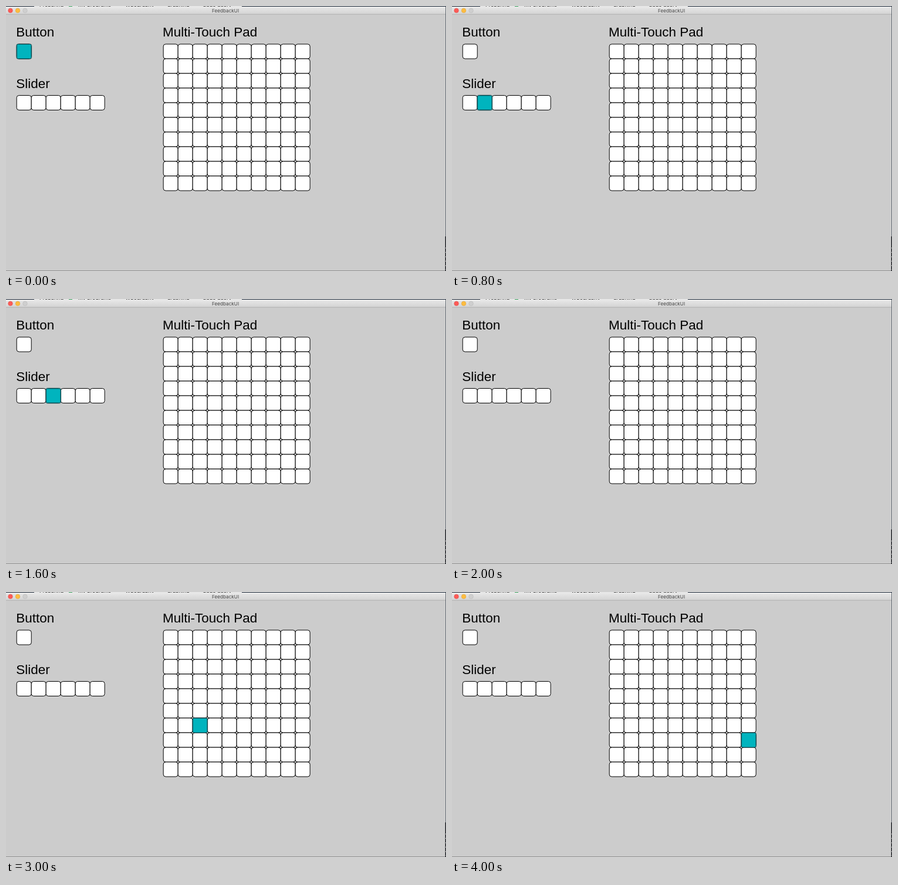
Animation, 750 px wide and 452 px high, one loop 4200 ms. Source, as an HTML page:

```html
<!DOCTYPE html>
<html lang="en">
<head>
<meta charset="utf-8">
<title>FeedbackUI</title>
<style>
  html, body { margin: 0; width: 100%; height: 100%; overflow: hidden; background: #ccc; }
  svg { display: block; width: 750px; height: 452px; }
  .head { font: 22.5px "Liberation Sans", Arial, sans-serif; }
  .title { font: 8.2px Inter, Roboto, sans-serif; fill: #444; text-anchor: middle; }
  .tab { font: 9px Inter, Roboto, sans-serif; fill: #111; }
  .cell { fill: #fff; stroke: #000; }
  #active { fill: #00b4be; stroke: #00343a; }
</style>
</head>
<body>
<svg viewBox="0 0 750 452">
  <defs>
    <linearGradient id="bar" x2="0" y2="1">
      <stop stop-color="#e9e9e9"/>
      <stop offset="1" stop-color="#d3d3d3"/>
    </linearGradient>
    <clipPath id="strip"><rect width="750" height="1.3"/></clipPath>
  </defs>

  <rect width="750" height="452" fill="#ccc"/>

  <g clip-path="url(#strip)">
    <rect width="750" height="2" fill="#1d2838"/>
    <rect x="48" width="354" height="2" fill="#e4e4e4"/>
    <rect x="107" width="6" height="2" fill="#35a05a"/>
    <g class="tab">
      <text x="57" y="1.2">Preparing</text>
      <text x="123" y="1.2">my programs</text>
      <text x="204" y="1.2">typography</text>
      <text x="275" y="1.2">graphing</text>
      <text x="336" y="1.2">page query</text>
    </g>
  </g>

  <rect y="1" width="749.5" height="13" fill="url(#bar)"/>
  <rect y="13.7" width="749.5" height=".8" fill="#a9a9a9"/>
  <circle cx="7.5" cy="7.7" r="3.8" fill="#fc5b57" stroke="#dc4643" stroke-width=".5"/>
  <circle cx="20" cy="7.7" r="3.8" fill="#fdbc40" stroke="#dda034" stroke-width=".5"/>
  <circle cx="32.5" cy="7.7" r="3.8" fill="#cfcfcf" stroke="#b5b5b5" stroke-width=".5"/>
  <text class="title" x="374" y="10.7">FeedbackUI</text>

  <rect y="451.3" width="750" height=".7" fill="#777"/>
  <rect x="749.3" width=".7" height="452" fill="#39424e"/>
  <path d="M749.4 393V452" stroke="#0c0f14" stroke-width="1.4"/>
  <path d="M749.5 412V450" stroke="#aaa" stroke-dasharray="1.5 6"/>

  <g class="head">
    <text x="17.2" y="52">Button</text>
    <text x="17.2" y="139.5">Slider</text>
    <text x="267" y="52">Multi-Touch Pad</text>
  </g>
  <g id="cells"></g>
  <rect id="active" width="25" height="25" rx="2"/>
</svg>
<script>
  const SIZE = 25, STEP = 200;
  const cells = document.getElementById('cells');
  const active = document.getElementById('active');

  function grid(x, y, cols, rows) {
    for (let r = 0; r < rows; r++) {
      for (let c = 0; c < cols; c++) {
        const box = document.createElementNS('http://www.w3.org/2000/svg', 'rect');
        const attrs = { class: 'cell', x: x + c * SIZE, y: y + r * SIZE, width: SIZE, height: SIZE, rx: 4 };
        for (const key in attrs) box.setAttribute(key, attrs[key]);
        cells.append(box);
      }
    }
    return (c, r = 0) => [x + c * SIZE, y + r * SIZE];
  }

  const button = grid(18.2, 65, 1, 1);
  const slider = grid(18.2, 152.5, 6, 1);
  const pad = grid(268.2, 65, 10, 10);

  // One touched cell per step; null means no touch.
  const touches = [
    button(0), button(0), null, slider(0), slider(1), slider(3), slider(5),
    slider(4), slider(2), slider(0), null, pad(1, 0), pad(4, 0), pad(7, 0),
    pad(2, 8), pad(2, 6), pad(2, 6), pad(2, 5), pad(4, 7), pad(7, 7), pad(9, 7)
  ];

  const frames = touches.map((at, i) => ({
    offset: i / touches.length,
    transform: at ? `translate(${at[0]}px, ${at[1]}px)` : 'translate(0px, 0px)',
    opacity: at ? 1 : 0,
    easing: 'step-end'
  }));
  frames.push({ ...frames[0], offset: 1 });
  active.animate(frames, { duration: touches.length * STEP, iterations: Infinity });
</script>
</body>
</html>
```
